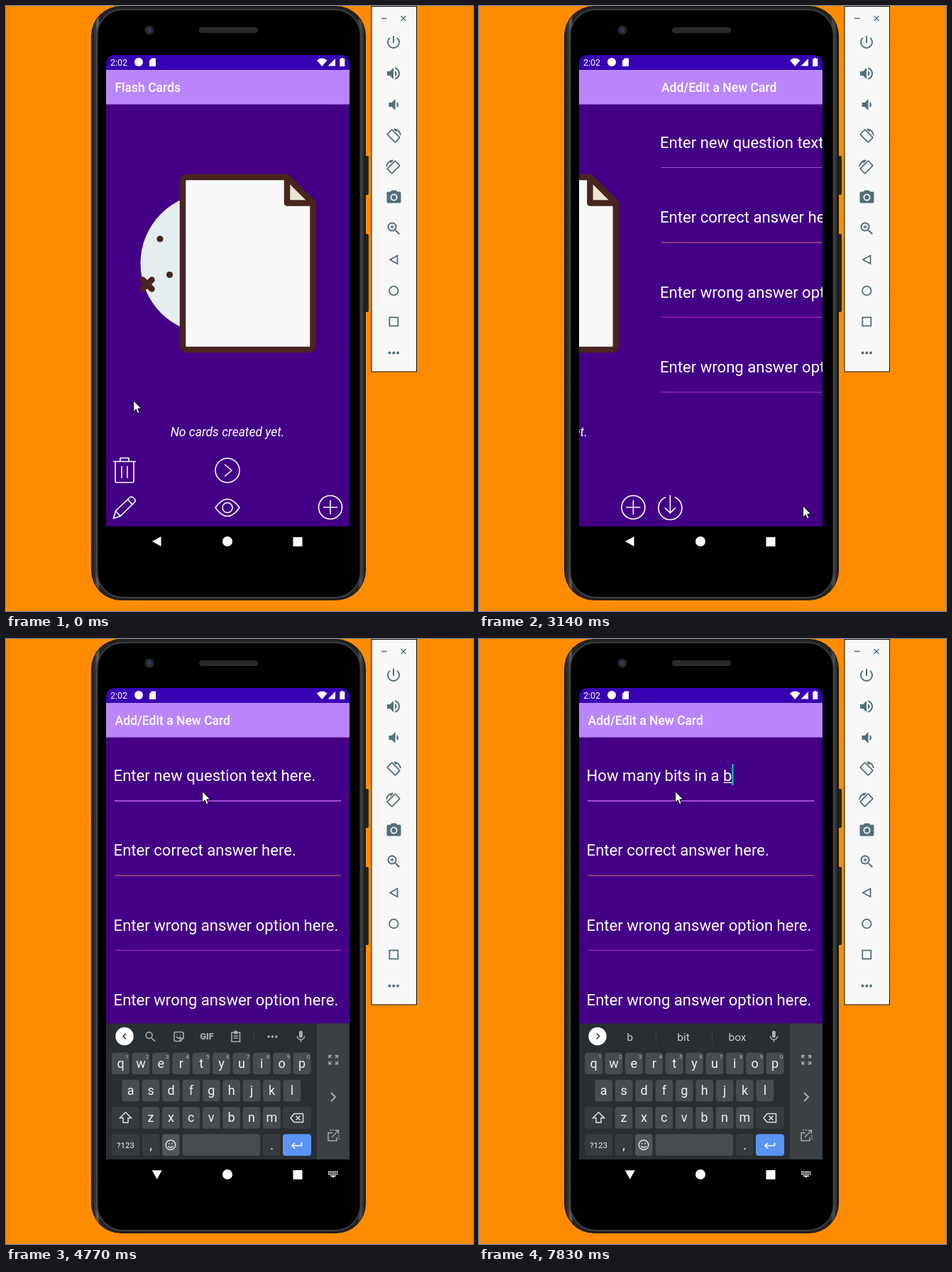
These frames come from a looping animation (658 by 852 pixels, 8 s). An HTML page:

```html
<!DOCTYPE html>
<html lang="en">
<head>
<meta charset="utf-8">
<title>Flash Cards</title>
<style>
html, body { margin: 0; width: 100%; height: 100%; overflow: hidden; background: #ff8c00; }
svg { display: block; width: 658px; height: 852px; }
text { font-family: Roboto, "Open Sans", sans-serif; fill: #fff; white-space: pre; }
.line { fill: none; stroke: #fff; stroke-width: 1.6; stroke-linejoin: round; }
.title { font-size: 17.5px; font-weight: 500; }
.field { font-size: 22.1px; }
.tool { fill: #546e7a; }
.toolline { fill: none; stroke: #546e7a; stroke-width: 1.8; }
.art { stroke: #4a241f; stroke-width: 8.5; stroke-linejoin: round; stroke-linecap: round; }
.key { font-size: 18px; text-anchor: middle; fill: #f1f3f4; }
.sup { font-size: 8px; text-anchor: middle; fill: #b9bcbf; }
.hint { font-size: 15.5px; text-anchor: middle; fill: #c9cccf; }
.grey { fill: #a9adb0; }
.greyline { fill: none; stroke: #a9adb0; stroke-width: 1.6; }
</style>
</head>
<body>
<svg viewBox="0 0 658 852">
  <defs>
    <clipPath id="screenClip"><path d="M141 733V83q0-14 14-14H470q14 0 14 14V733z"/></clipPath>
    <linearGradient id="rim">
      <stop offset="0" stop-color="#1b1c1e"/><stop offset=".014" stop-color="#36383a"/>
      <stop offset=".02" stop-color="#6a6c6e"/><stop offset=".03" stop-color="#222"/>
      <stop offset=".972" stop-color="#222"/><stop offset=".982" stop-color="#505254"/>
      <stop offset="1" stop-color="#18191b"/>
    </linearGradient>
    <path id="mic" d="M12 14c1.66 0 3-1.34 3-3V5a3 3 0 0 0-6 0v6c0 1.66 1.34 3 3 3zm5.3-3c0 3-2.54 5.1-5.3 5.1S6.7 14 6.7 11H5c0 3.41 2.72 6.23 6 6.72V21h2v-3.28c3.28-.48 6-3.3 6-6.72h-1.7z"/>
    <path id="lens" fill-rule="evenodd" d="M15.5 14h-.79l-.28-.27A6.5 6.5 0 1 0 13.73 14.43l.27.28v.79l5 4.99L20.49 19zM9.5 14a4.5 4.5 0 1 1 0-9 4.5 4.5 0 0 1 0 9z"/>
  </defs>
  <rect width="658" height="852" fill="#ff8c00"/>

  <!-- phone -->
  <rect x="503" y="211" width="8" height="55" rx="2" fill="#232425"/>
  <rect x="503" y="321" width="8" height="110" rx="2" fill="#232425"/>
  <rect x="120" y="0" width="387" height="837" rx="42" fill="#17181a"/>
  <rect x="121" y="1" width="385" height="835" rx="41" fill="url(#rim)"/>
  <rect x="128.5" y="5" width="371" height="828" rx="36" stroke="#3b3c3e" stroke-width="2"/>
  <rect x="131.5" y="8" width="366" height="823" rx="33"/>
  <rect x="272" y="30" width="83" height="8" rx="4" fill="#2a2a2b"/>
  <circle cx="202" cy="34" r="6.5" fill="#26282b"/><circle cx="202" cy="34" r="3" fill="#2c3a5e"/>

  <g clip-path="url(#screenClip)">
    <rect x="141" y="69" width="343" height="664" fill="#430086"/>
    <rect x="141" y="69" width="343" height="21" fill="#3700b3"/>
    <rect x="141" y="90" width="343" height="48.5" fill="#bb86fc"/>
    <text x="147" y="84" font-size="12.5">2:02</text>
    <g fill="#fff">
      <circle cx="187" cy="79" r="6"/>
      <path d="M205.500 73.500H210q1 0 1 1V84q0 1-1 1h-7q-1 0-1-1v-7z"/>
      <path d="M438 76.500Q445.300 70.500 452.500 76.500L445.300 85zM464 74V84.500H453.500z"/>
      <path d="M472.300 73h3v1.300h2V85h-7V74.300h2z"/>
    </g>

    <g id="home">
      <text class="title" x="153.500" y="121">Flash Cards</text>
      <circle cx="288.500" cy="362.500" r="99" fill="#e4eef0"/>
      <g fill="#4a241f"><circle cx="217" cy="328" r="4.600"/><circle cx="230.500" cy="378.500" r="4.600"/></g>
      <path class="art" d="M192.500 385.500l13 13M205.500 385.500l-13 13"/>
      <path class="art" fill="#f8f8f8" d="M255 241H396L432.500 278V478q0 6-6 6H255q-6 0-6-6V247q0-6 6-6z"/>
      <path class="art" fill="#ebe7d0" d="M396 241V277.500H432.500z"/>
      <text x="312" y="605.500" font-size="17.500" font-style="italic" text-anchor="middle">No cards created yet.</text>
      <g class="line">
        <path d="M151 641.500H183M161 641V636.500H173V641M154 642V669q0 2 2 2H178q2 0 2-2V642M163 648V665M171 648V665"/>
        <circle cx="312" cy="654" r="17"/><path d="M308 645.500l10 8.500-10 8.500"/>
        <path d="M151.500 721.500L154.500 711 174.500 692q2.500-2 5 .500l1.500 1.500q2.500 2.500 0 5L161 718.500zM154.500 711l6.500 7.500M171.500 695l6.500 7"/>
        <path d="M295 706.500Q312 682.500 329 706.500 312 730.500 295 706.500z"/><circle cx="312" cy="706.500" r="7"/>
        <circle cx="457" cy="706" r="16.500"/><path d="M447 706H467M457 696V716"/>
      </g>
    </g>

    <g id="edit">
      <text class="title" x="153.500" y="121">Add/Edit a New Card</text>
      <text class="field" id="question" x="151.600" y="199.500"></text>
      <rect id="mark" y="201.500" height="1.300" fill="#fff"/>
      <rect id="caret" y="176" width="2" height="30" fill="#10cfc4"/>
      <rect id="focus" x="153" y="227" width="319" height="1" fill="#a04ae0"/>
      <text class="field" x="151.600" y="305">Enter correct answer here.</text>
      <rect x="153" y="332.500" width="319" height="1.200" fill="#bd5f73"/>
      <text class="field" x="151.600" y="410.500">Enter wrong answer option here.</text>
      <rect x="153" y="437.700" width="319" height="1.200" fill="#ad22c4"/>
      <text class="field" x="151.600" y="516">Enter wrong answer option here.</text>
      <rect x="153" y="543.200" width="319" height="1.200" fill="#a22ac6"/>
      <g class="line">
        <path d="M159.500 691.800A16.500 16.500 0 1 0 172.500 691.800M166 689V714M158.500 706.500L166 714l7.500-7.500"/>
        <circle cx="457.500" cy="706.500" r="17"/><path d="M449 698l17 17M466 698l-17 17"/>
      </g>
    </g>

    <g id="keyboard">
      <rect x="141" y="541.500" width="343" height="192" fill="#292e32"/>
      <rect x="438" y="541.500" width="46" height="192" fill="#3a4044"/>
      <g id="keys"></g>
      <circle cx="167" cy="559.500" r="12.700" fill="#fff"/>
      <path id="toggle" d="M169 555.500l-4 4 4 4" fill="none" stroke="#33383c" stroke-width="1.600"/>
      <use href="#mic" class="grey" transform="translate(405.500 550) scale(.83)"/>
      <g id="strip">
        <use href="#lens" class="grey" transform="translate(194 550.500) scale(.8)"/>
        <path class="greyline" d="M239 553.500h9q2 0 2 2V562l-4.500 4.500H239q-2 0-2-2v-9q0-2 2-2zM250 562h-4.500v4.500M240 560q3 4.500 6 0M240.500 557h1M245.500 557h1"/>
        <text x="283" y="564" font-size="12.500" font-weight="900" text-anchor="middle" class="grey">GIF</text>
        <path class="greyline" d="M318 554h11.500V567H318zM321 555.500h5.500M320.500 559h6.500M320.500 562h6.500M321.500 552.500h4.500"/>
        <path d="M349.500 550V569" stroke="#3d4246"/>
        <g class="grey"><circle cx="370" cy="560" r="1.800"/><circle cx="375.500" cy="560" r="1.800"/><circle cx="381" cy="560" r="1.800"/></g>
      </g>
      <g id="hints">
        <path d="M249.500 550V570M328.500 550V570" stroke="#3d4246"/>
        <text class="hint" x="212.500" y="566"></text><text class="hint" x="288" y="566"></text><text class="hint" x="364" y="566"></text>
      </g>
      <g class="greyline">
        <path d="M455 590.500V586.500h4M463.500 586.500h4v4M467.500 594.500v4h-4M459 598.500h-4v-4M455 586.500l3.500 3.500M467.500 586.500l-3.500 3.500M467.500 598.500l-3.500-3.500M455 598.500l3.500-3.500" stroke-width="1.300"/>
        <path d="M458 639l6 6-6 6" stroke-width="2"/>
        <path d="M460 695.500h-6V706.500h12v-5M459 701.500l9-9M463.500 692h5v5" stroke-width="1.400"/>
        <path d="M456 691.500h6M469 699v6" stroke-dasharray="2 1.500" stroke-width="1.300"/>
      </g>
      <g fill="none" stroke="#e0e2e4" stroke-width="1.500">
        <path d="M168.500 666.500l-8 8h4.500v6.500h7v-6.500h4.500z"/>
        <path d="M406 668.500h12.500v12H406l-5-6zM408.500 671.500l6 6M414.500 671.500l-6 6"/>
        <circle cx="232" cy="712.500" r="6.800"/><path d="M228.500 714q3.500 4.500 7 0M229 710.500h1.500M233.500 710.500h1.500"/>
        <path d="M416.500 709v4.500H403.500M407 709.500l-4 4 4 4" stroke="#fff" stroke-width="1.700"/>
      </g>
    </g>
  </g>

  <g fill="#fff">
    <path id="back" d="M206 754L218.500 747V761z"/>
    <circle cx="312" cy="754" r="7"/>
    <rect x="404.500" y="748" width="13" height="13"/>
    <g id="imeIcon">
      <path d="M454 750.500H467.500M454 753.500H467.500" stroke="#fff" stroke-width="2" stroke-dasharray="1.700 .700"/>
      <path d="M457 755.500h8v1.500h-2.500l-1.500 2-1.500-2H457z"/>
    </g>
  </g>

  <!-- side toolbar -->
  <rect x="515" y=".5" width="63.500" height="514.500" fill="#f8f8f8" stroke="#111"/>
  <path class="toolline" stroke-width="1.500" d="M529 17.500h7.500M556.500 14l7 7M563.500 14l-7 7" style="stroke-width:1.400"/>
  <g class="tool">
    <path transform="translate(534 39)" d="M13 3h-2v10h2V3zm4.830 2.170l-1.420 1.420C17.990 7.860 19 9.810 19 12c0 3.870-3.130 7-7 7s-7-3.130-7-7c0-2.190 1.010-4.140 2.580-5.420L6.170 5.170C4.230 6.820 3 9.260 3 12a9 9 0 0 0 18 0c0-2.740-1.230-5.180-3.170-6.830z"/>
    <path transform="translate(534 83)" d="M3 9v6h4l5 5V4L7 9H3zm13.500 3c0-1.770-1.020-3.290-2.500-4.030v8.050c1.480-.730 2.500-2.250 2.500-4.020zM14 3.230v2.060c2.890.860 5 3.540 5 6.710s-2.110 5.850-5 6.710v2.060c4.010-.910 7-4.490 7-8.770s-2.990-7.860-7-8.770z"/>
    <path transform="translate(534.500 127)" d="M18.500 12c0-1.770-1.020-3.290-2.500-4.030v8.050c1.480-.730 2.500-2.250 2.500-4.020zM5 9v6h4l5 5V4L9 9H5z"/>
    <path fill-rule="evenodd" transform="translate(534.500 257.500)" d="M9 2L7.170 4H4c-1.100 0-2 .900-2 2v12c0 1.100.900 2 2 2h16c1.100 0 2-.900 2-2V6c0-1.100-.900-2-2-2h-3.170L15 2zM12 17a5 5 0 1 1 0-10 5 5 0 0 1 0 10zM12 15.200a3.200 3.200 0 1 0 0-6.400 3.200 3.200 0 0 0 0 6.400z"/>
    <use href="#lens" transform="translate(534.500 301.500)"/>
    <path transform="translate(534.500 301.500)" d="M10.200 7H8.800v1.800H7v1.400h1.800V12h1.400v-1.800H12V8.800h-1.800z"/>
    <circle cx="540.500" cy="488.500" r="2"/><circle cx="546.300" cy="488.500" r="2"/><circle cx="552" cy="488.500" r="2"/>
  </g>
  <g class="toolline">
    <g id="turn">
      <rect x="-8" y="-4.800" width="16" height="9.600" rx="1" transform="rotate(45)"/>
      <path d="M1-9.800A10 10 0 0 1 10-1M1-10l3.500 3.500"/>
    </g>
    <path d="M551.500 351.500V363L541 357.200z"/>
    <circle cx="546.300" cy="401" r="6.300"/>
    <rect x="540.300" y="438.500" width="12" height="12"/>
  </g>

  <path id="pointer" d="M.5 .5V16.500L4.200 13 6.600 18.800 9.200 17.700 6.800 12H11.800z" fill="#fff" stroke="#000" stroke-width="1"/>
</svg>
<script>
const $ = id => document.getElementById(id);
const NS = 'http://www.w3.org/2000/svg';
const LOOP = 8000, WIDTH = 343, TEXT_X = 151.6;

function add(parent, tag, attrs, content = '') {
  const el = document.createElementNS(NS, tag);
  for (const k in attrs) el.setAttribute(k, attrs[k]);
  el.textContent = content;
  return parent.appendChild(el);
}
const show = (el, on) => el.setAttribute('visibility', on ? 'visible' : 'hidden');
const move = (el, x, y) => el.setAttribute('transform', `translate(${x} ${y})`);

// Number of ticks passed when n ticks are spread evenly from t0 to t1.
const ticks = (t, t0, t1, n) =>
  t < t0 ? 0 : Math.min(n, 1 + Math.floor((t - t0) / (t1 - t0) * (n - 1) + 1e-6));

const turn = $('turn');
const mirrored = turn.cloneNode(true);
mirrored.removeAttribute('id');
move(turn, 546, 183);
mirrored.setAttribute('transform', 'translate(546 227) scale(-1 1)');
turn.after(mirrored);

// Keyboard
const keys = $('keys'), DARK = '#363b3f', LIGHT = '#474c50';
const key = (x, y, w, fill) => add(keys, 'rect', { x, y, width: w, height: 30.5, rx: 4, fill });
[['qwertyuiop', 161.5, 582.5], ['asdfghjkl', 175.7, 620.8], ['zxcvbnm', 204, 659]].forEach(([row, x0, y], r) =>
  [...row].forEach((c, i) => {
    const x = x0 + 28.4 * i;
    key(x - 12.4, y, 24.8, LIGHT);
    add(keys, 'text', { x, y: y + 21, class: 'key' }, c);
    if (!r) add(keys, 'text', { x: x + 9, y: y + 8.5, class: 'sup' }, (i + 1) % 10);
  }));
[[149, 659, 39, DARK], [390, 659, 40, DARK], [149, 697.3, 39, DARK], [192, 697.3, 24.5, DARK],
 [220, 697.3, 24.5, '#505558'], [248.5, 697.3, 109.5, LIGHT], [362, 697.3, 24.5, DARK],
 [390, 697.3, 40, '#5a95f3']].forEach(k => key(...k));
add(keys, 'text', { x: 168.5, y: 717, class: 'key', style: 'font-size:11.5px' }, '?123');
add(keys, 'text', { x: 204, y: 719, class: 'key' }, ',');
add(keys, 'text', { x: 374.5, y: 719, class: 'key' }, '.');

// Pointer strokes: start, end, ticks, cubic curve
const strokes = [
  [150, 1140, 8, [179, 225, 355, 368], [555, 488, 560, 672]],
  [1260, 1650, 4, [368, 372, 335, 319], [672, 700, 675, 655.5]],
  [1930, 2440, 5, [319, 360, 420, 456], [655.5, 680, 720, 703.5]],
  [3380, 3800, 4, [456, 460, 393, 276], [703.5, 700, 558, 214]]
];
const cubic = ([a, b, c, d], s) => {
  const r = 1 - s;
  return a * r * r * r + 3 * b * r * r * s + 3 * c * r * s * s + d * s * s * s;
};

const typing = [[4920, 5430, 'How m'], [5550, 5970, 'any '], [6220, 6520, 'bit'], [6810, 7830, 's in a b']];
const guesses = {
  H: 'Hi,How', Ho: 'How,Hot', How: 'How to,Howe', m: 'my,me', ma: 'may,man', man: 'many,mane',
  many: 'ma you,ma your', b: 'bit,box', bi: 'bit,big', bit: 'bits,bite', bits: 'bit,bite',
  i: 'in,is', in: 'on,inn', a: 'an,at'
};
const pen = document.createElement('canvas').getContext('2d');
const measure = s => {
  pen.font = '22.1px Roboto, "Open Sans", sans-serif';
  return pen.measureText(s).width;
};
const hints = $('hints').querySelectorAll('text');

function drawField(t) {
  const typed = typing.map(([a, b, s]) => s.slice(0, ticks(t, a, b, s.length))).join('');
  const [, before, word] = typed.match(/^(.*?)(\S*) ?$/);
  const x = TEXT_X + measure(before);
  $('question').textContent = typed || 'Enter new question text here.';
  $('mark').setAttribute('x', x + .5);
  $('mark').setAttribute('width', measure(word));
  $('caret').setAttribute('x', TEXT_X + measure(typed) + (typed ? 0 : .4));
  show($('caret'), typed || (t >= 4200 && t < 4770));
  $('focus').setAttribute('height', t < 3920 ? 1 : 2);

  show($('strip'), !typed);
  show($('hints'), typed);
  $('toggle').setAttribute('d', typed ? 'M165.500 555.500l4 4-4 4' : 'M169 555.500l-4 4 4 4');
  const list = [word, ...(guesses[word] || ',').split(',')];
  hints.forEach((el, i) => el.textContent = list[i]);
}

function draw(t) {
  let x = 179, y = 555;
  for (const [a, b, n, px, py] of strokes) {
    const k = ticks(t, a, b, n);
    if (k) { x = cubic(px, k / n); y = cubic(py, k / n); }
  }
  move($('pointer'), x, y);

  const k = ticks(t, 2870, 3380, 5);
  const slide = k && Math.min(1, .12 + .255 * (k - 1));
  const shift = WIDTH * (1 - Math.cos(Math.PI * slide)) / 2;
  move($('home'), -shift, 0);
  move($('edit'), WIDTH - shift, 0);

  move($('keyboard'), 0, [195, 70, 12, 0][ticks(t, 4470, 4770, 3)]);
  $('back').setAttribute('transform', `rotate(${t < 4200 ? 0 : t < 4470 ? -20 : -90} 212.7 754)`);
  show($('imeIcon'), t >= 4200);
  drawField(t);
}

function loop() {
  draw(performance.now() % LOOP);
  requestAnimationFrame(loop);
}
loop();
</script>
</body>
</html>
```
